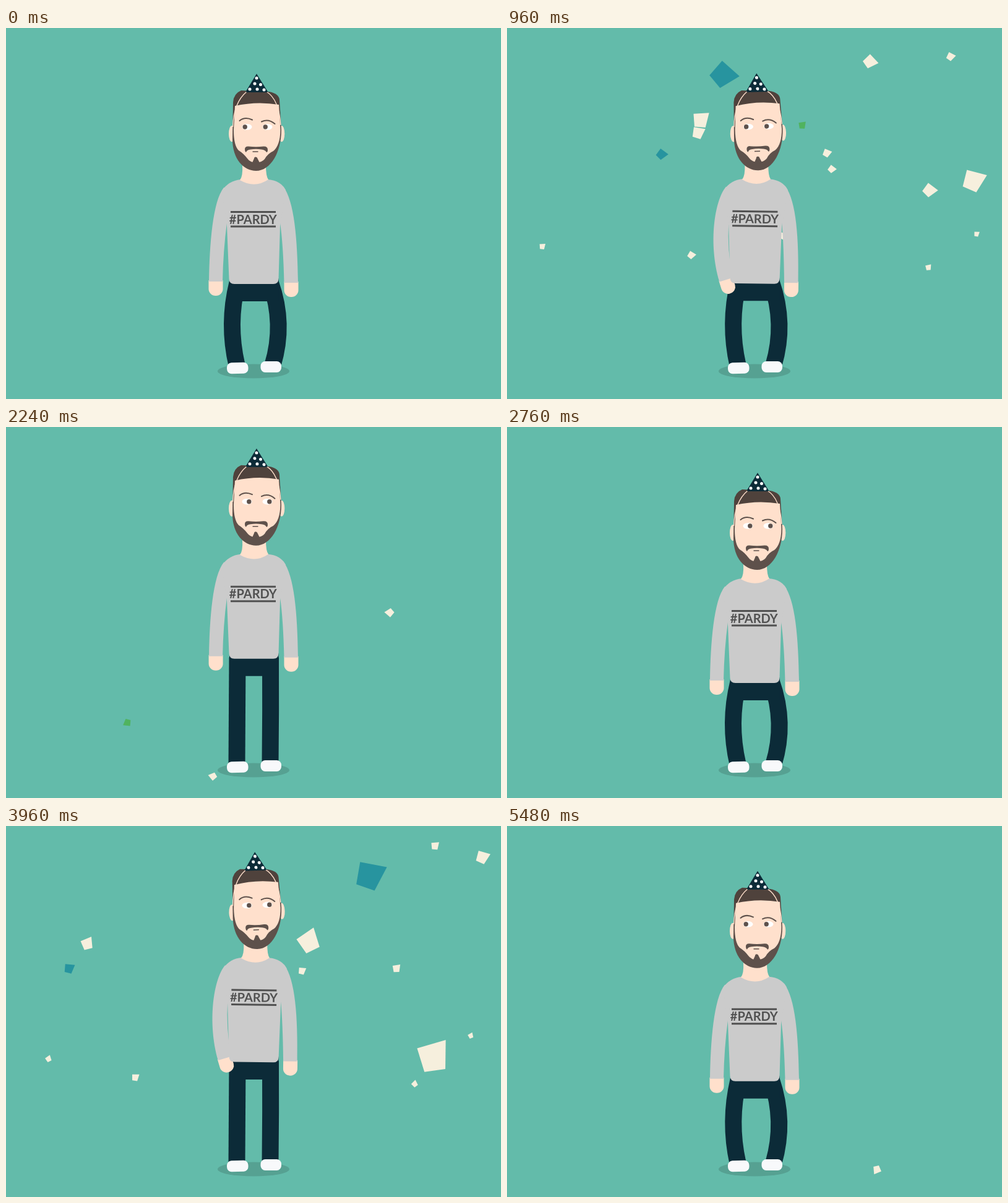
An HTML page with a canvas for the animation above (5520 ms loop, 800 px wide and 600 px high).

```html
<!DOCTYPE html>
<html lang="en">
<head>
<meta charset="utf-8">
<title>Party dance</title>
<style>
  html, body { margin: 0; width: 100%; height: 100%; overflow: hidden; background: #63bbaa; }
  canvas { display: block; }
</style>
</head>
<body>
<canvas id="stage" width="800" height="600"></canvas>
<script>
const ctx = document.getElementById('stage').getContext('2d');
const LOOP = 5520, CYCLE = 2760, BEAT = 920, STEP = 40;
const C = {
  bg: '#63bbaa', shadow: '#56a192', navy: '#0c2b38', shoe: '#f8f9fb', shirt: '#cbcbcb',
  print: '#515151', skin: '#ffe0cc', hair: '#4f423c', beard: '#5e514b',
  cream: '#f6efdd', blue: '#27949f', green: '#50b35f'
};

// ---- timing helpers ----
const bezier = (a, b, u) => 3 * (1 - u) * (1 - u) * u * a + 3 * (1 - u) * u * u * b + u * u * u;

function ease(x1, y1, x2, y2, x) {
  let lo = 0, hi = 1;
  for (let i = 0; i < 24; i++) {
    const mid = (lo + hi) / 2;
    if (bezier(x1, x2, mid) < x) lo = mid; else hi = mid;
  }
  return bezier(y1, y2, lo);
}

// Rises to 1 at peak, back to 0 at end.
function swell(t, peak, end) {
  const u = t < peak ? t / peak : Math.max(0, (end - t) / (end - peak));
  return (1 - Math.cos(Math.PI * u)) / 2;
}

function bounce(t) {
  const u = (t % BEAT) / (BEAT / 2);
  return 40 * (u < 1 ? ease(.4, 0, .4, 1, u) : 1 - ease(.4, 0, .5, .88, u - 1));
}

// ---- drawing helpers ----
function fill(path, color) {
  ctx.fillStyle = color;
  ctx.fill(typeof path === 'string' ? new Path2D(path) : path);
}

function line(path, color, width) {
  ctx.strokeStyle = color;
  ctx.lineWidth = width;
  ctx.stroke(new Path2D(path));
}

function oval(x, y, rx, ry, color) {
  ctx.beginPath();
  ctx.ellipse(x, y, rx, ry, 0, 0, 7);
  ctx.fillStyle = color;
  ctx.fill();
}

function box(x, y, w, h, r, color) {
  ctx.beginPath();
  ctx.roundRect(x, y, w, h, r);
  ctx.fillStyle = color;
  ctx.fill();
}

function turn(x, y, deg) {
  ctx.translate(x, y);
  ctx.rotate(deg * Math.PI / 180);
  ctx.translate(-x, -y);
}

function group(draw) {
  ctx.save();
  draw();
  ctx.restore();
}

// ---- confetti: each piece passes a point at START and another at its end time ----
const START = 960, DRAG = .55, FALL = 1045;
const FLIGHTS = {
  // x1, y1, x2, y2, size, angle, colour, later size
  1200: [
    [350, 75, 588, 79, 36, 55, 'blue', 42],
    [250, 204, 102, 230, 15, 50, 'blue'],
    [313, 148, 489, 186, 24, 10, 'cream', 32],
    [309, 169, 131, 190, 18, 22],
    [517, 202, 631, 230, 12, 35],
    [587, 54, 770, 50, 19, 60],
    [754, 246, 690, 372, 32, 28, 'cream', 46],
    [683, 262, 850, 318, 19, 50]
  ],
  1720: [
    [298, 367, 52, 577, 11, 45],
    [57, 353, 89, 519, 9, 10],
    [446, 336, 267, 528, 11, 30],
    [681, 387, 624, 571, 9, 0]
  ],
  2040: [
    [477, 157, 228, 385, 11, 5, 'green', 11],
    [525, 228, 356, 470, 11, 50],
    [759, 333, 730, 575, 8, 15]
  ],
  2720: [[717, 46, 598, 556, 12, 40]]
};
const PIECES = Object.entries(FLIGHTS).flatMap(([end, rows]) =>
  rows.map(([x1, y1, x2, y2, size, angle, color = 'cream', later = size]) => {
    const d = (end - START) / 1000, e = glide(d);
    return {
      x: x1, y: y1, size, angle, color, grow: later / size,
      vx: (x2 - x1) / e, vy: (y2 - y1 - FALL * d) / e
    };
  }));
const CROSSING = PIECES.find(p => p.x === 525);
const SCRAP = new Path2D('M-.54 -.3L.48 -.54L.41 .48L-.33 .54Z');

function glide(s) { return (1 - Math.exp(-DRAG * s)) / DRAG; }

function drawPiece(p, t) {
  if (t < STEP) return;
  const s = (t - START) / 1000, e = glide(s);
  const size = p.size * Math.pow(p.grow, s / .24);
  group(() => {
    ctx.translate(p.x + p.vx * e, p.y + FALL * s + p.vy * e);
    ctx.rotate((p.angle - 130 * s) * Math.PI / 180);
    ctx.scale(size, size);
    fill(SCRAP, C[p.color]);
  });
}

// ---- figure ----
function drawLegs(lift) {
  const k = Math.max(0, 1 - lift / 32);
  const top = 412 - lift, mid = (top + 545) / 2;
  line(`M374 ${top}Q${373.5 - 16 * k} ${mid} 373 545`, C.navy, 27);
  line(`M427.5 ${top}Q${428 + 23 * k} ${mid} ${427 + 4 * k} 545`, C.navy, 27);
  box(361, 405 - lift, 79.5, 37, 0, C.navy);
  group(() => { turn(374, 550, -2); box(357, 541, 34.5, 18, 7.5, C.shoe); });
  box(411.5, 539, 33.5, 18, 7.5, C.shoe);
}

function drawHand(x, y, deg) {
  group(() => {
    turn(x, y, deg);
    box(x - 11.5, y - 2, 23, 25, [0, 0, 11, 11], C.skin);
  });
}

function drawTorso(swing) {
  const cuff = 339 + 15 * swing, tilt = 18 * swing, rad = tilt * Math.PI / 180;
  const dx = 11 * Math.cos(rad), dy = 11 * Math.sin(rad), y = 410 - 1.5 * swing;
  drawHand(cuff, y, -tilt);
  fill(`M352 258C334 280 ${329 - 5 * swing} 350 ${cuff - dx} ${y + dy}L${cuff + dx} ${y - dy}` +
    `Q${351 + 4 * swing} 360 357 315L372 262Z`, C.shirt);

  const shift = -1.5 * swing;
  drawHand(461 + shift, 412, 0);
  fill(`M448 256C466 280 471 340 ${472 + shift} 412L${449.5 + shift} 412` +
    `Q${448 + shift} 350 443 315L430 262Z`, C.shirt);

  fill('M379 245Q360 247 349 263L357 320L360.5 406Q361 414 369 414L432 414Q440 414 440.5 406' +
    'L443 320L452 262Q444 247 424 245Z', C.shirt);
  fill('M382 222L420 222Q420 240 424 245Q402 260 378 246Q383 240 382 222Z', C.skin);

  box(363, 296, 73, 3, 0, C.print);
  box(363, 319.5, 73, 3, 0, C.print);
  ctx.fillStyle = C.print;
  ctx.font = '700 20px Lato, sans-serif';
  ctx.textAlign = 'center';
  ctx.fillText('#PARDY', 399.3, 316.5);
}

function drawEyes(look, open) {
  group(() => {
    ctx.translate(0, 160);
    ctx.scale(1, open);
    for (const x of [389.5, 422.5]) {
      oval(x, 0, 8, 4.8, '#fff');
      oval(x + look * 3.3, 0, 3.7, 3.7, C.beard);
    }
  });
}

function drawHat() {
  line('M389 103Q368 120 366.5 160', C.skin, 1.4);
  line('M421 103Q441 115 444 157', C.skin, 1.4);
  fill('M405 74L388 102Q387.500 104 390 104L421 104Q423.500 104 422.500 102Z', C.navy);
  for (const [x, y] of [[405, 81], [402, 90], [411.5, 91.5], [394, 99], [406, 99], [417, 100]])
    oval(x, y, 2.5, 2.5, '#fff');
}

function drawHead(look, open) {
  oval(365, 171, 5, 13, C.skin);
  oval(445.5, 171, 4.8, 13, C.skin);
  const shade = ctx.createLinearGradient(0, 120, 0, 180);
  shade.addColorStop(0, C.hair);
  shade.addColorStop(1, C.beard);
  fill('M366 180L367 120Q368 106 380 101L425 103Q441 106 442 116L445 165' +
    'C445 200 428 231 404 231C384 231 366 212 366 180Z', shade);
  fill('M370 126Q405 118 441 124L443.500 165Q443 190 432 199Q423 203 418 212Q414 217 404 218' +
    'Q394 217 390 211Q384 203 376 198Q368 190 368 165Z', C.skin);
  fill('M401 211Q401 208.500 403.500 208.500Q406 208.500 406.500 211L411 220L397 220Z', C.beard);
  fill('M386 196Q386 191 392 191.500Q404 193 416 191.500Q423 191 423 197Q423 201 421 201' +
    'Q419 197 413 196.500Q404 195 395 196.500Q389 197 388 201Q386 200 386 196Z', C.beard);
  line('M398.500 200L407.500 200', C.beard, 1.5);
  ctx.lineCap = 'round';
  line('M377.500 150Q386 143 398 148.500', C.beard, 2);
  line('M413 151.500Q424 146 434.500 155', C.beard, 2);
  ctx.lineCap = 'butt';
  drawEyes(look, open);
  drawHat();
}

function render(time) {
  const t = time % CYCLE;
  const lift = bounce(t), swing = swell(t, 1020, 2300), nod = swell(t, 1500, 2300);
  const open = Math.min(1, .35 + Math.max(0, Math.abs(t - 2060) - 30) / 130);
  const look = time > 2060 && time < CYCLE + 2060 ? 1 : -1;
  const inFront = t < 1880;

  ctx.fillStyle = C.bg;
  ctx.fillRect(0, 0, 800, 600);
  oval(400, 555, 58, 11.5, C.shadow);
  for (const p of PIECES) if (p !== CROSSING || !inFront) drawPiece(p, t);

  drawLegs(lift);
  group(() => {
    ctx.translate(0, -lift);
    turn(400, 414, .7 * swing);
    drawTorso(swing);
  });
  group(() => {
    ctx.translate(2 * swing, -lift);
    turn(404, 218, -2.1 * nod);
    drawHead(look, open);
  });
  if (inFront) drawPiece(CROSSING, t);
}

const begin = performance.now();
function tick() {
  const time = (performance.now() - begin) % LOOP;
  render(Math.floor(time / STEP) * STEP);
  requestAnimationFrame(tick);
}
tick();
</script>
</body>
</html>
```
